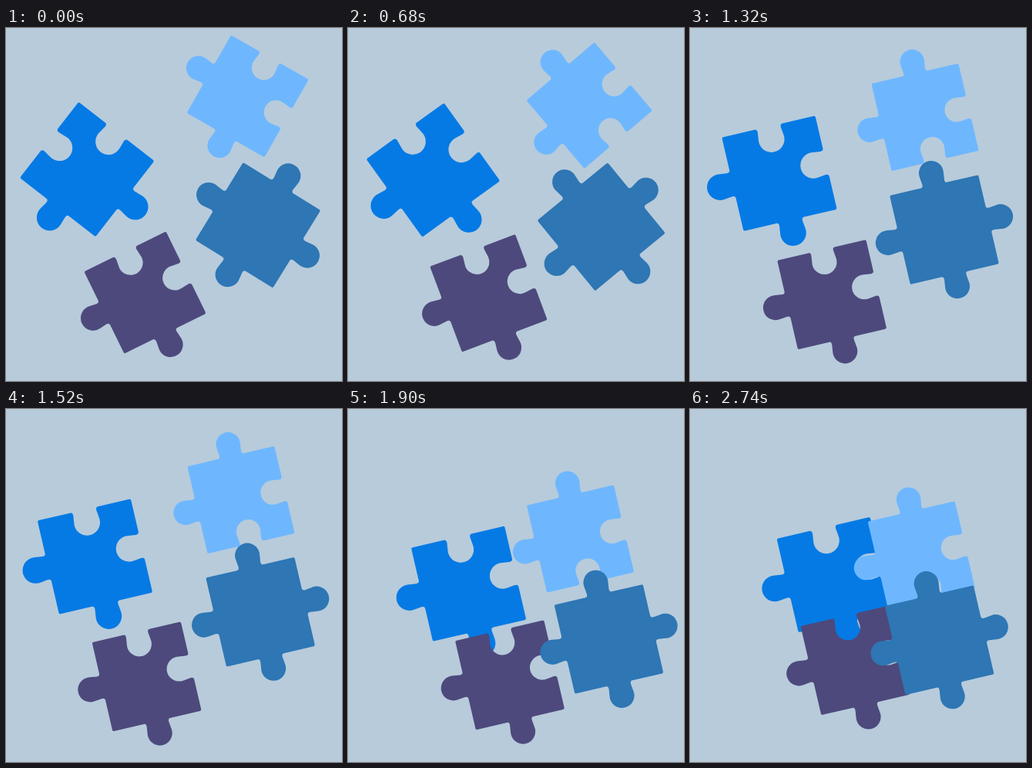
An HTML page with a canvas that plays this animation: 436x457 px, repeating every 6040 ms.

```html
<!DOCTYPE html>
<html lang="en">
<head>
<meta charset="utf-8">
<title>Puzzle</title>
<style>
html, body { margin: 0; width: 100%; height: 100%; overflow: hidden; background: #b7cbdb; }
canvas { display: block; }
</style>
</head>
<body>
<canvas id="stage" width="436" height="457"></canvas>
<script>
const ctx = document.getElementById('stage').getContext('2d');
const LOOP = 6040, TURN_END = 1240, JOIN_END = 2740;
const HALF = 59, END_ANGLE = -13.1;

// Progress values at which the waypoints below are reached.
const TURN_STOPS = [0, 0.42, 1];
const JOIN_STOPS = [0, 0.13, 0.365, 0.715, 0.939, 1];

// Back to front. Edges run top, right, bottom, left: 1 is a knob, -1 a socket.
const pieces = [
  { color: '#057ae4', size: 124.4, angle: -52.2, edges: [-1, -1, 1, 1],
    turn: [[105.2, 183], [110.5, 183.8], [116, 188]],
    join: [[116, 188], [113.2, 202.2], [118, 226], [156.5, 226.2], [181.5, 214.9], [187.2, 214.5]] },
  { color: '#4d497c', size: 118.3, angle: -26.1, edges: [-1, -1, 1, 1],
    turn: [[180.5, 342.5], [182.5, 343.3], [184.3, 345]],
    join: [[184.3, 345], [180, 352.5], [188, 361.7], [210, 344.4], [214, 329.5], [214.5, 325.3]] },
  { color: '#6eb7ff', size: 116, angle: -60.3, edges: [1, -1, -1, 1],
    turn: [[313.7, 88.3], [313.2, 100.2], [305, 115.3]],
    join: [[305, 115.3], [304.5, 125], [303, 142.3], [301.5, 168], [300.5, 184.5], [300.3, 189]] },
  { color: '#2e76b4', size: 118.1, angle: -58.4, edges: [1, 1, 1, 1],
    turn: [[327, 255.3], [328.7, 257.3], [330, 261]],
    join: [[330, 261], [332, 267.8], [339, 280.5], [338.5, 297.8], [327.5, 300.5], [323.7, 299.2]] }
];

// Ease with flat ends; x1 and x2 are the handle positions in time.
function ease(x, x1, x2) {
  if (x <= 0) return 0;
  if (x >= 1) return 1;
  let lo = 0, hi = 1, u;
  for (let i = 0; i < 30; i++) {
    u = (lo + hi) / 2;
    const v = 1 - u;
    if (3 * v * v * u * x1 + 3 * v * u * u * x2 + u * u * u < x) lo = u;
    else hi = u;
  }
  return u * u * (3 - 2 * u);
}

// Point at p on the smooth polynomial path through all waypoints.
function along(points, stops, p) {
  let x = 0, y = 0;
  points.forEach((pt, i) => {
    let w = 1;
    stops.forEach((s, j) => { if (j !== i) w *= (p - s) / (stops[i] - s); });
    x += w * pt[0];
    y += w * pt[1];
  });
  return [x, y];
}

function drawEdge(d) {
  ctx.lineTo(-17.5, -HALF);
  ctx.quadraticCurveTo(-14.5, -HALF, -14.6, -HALF - 4 * d);
  ctx.arc(0, -HALF - 16 * d, 16, d * (Math.PI - 0.19), d * (2 * Math.PI + 0.19), d < 0);
  ctx.lineTo(14.6, -HALF - 4 * d);
  ctx.quadraticCurveTo(14.5, -HALF, 17.5, -HALF);
  ctx.lineTo(HALF - 2, -HALF);
  ctx.quadraticCurveTo(HALF, -HALF, HALF, 2 - HALF);
}

function drawPiece(piece, t) {
  const turned = ease(t / TURN_END, 0.883, 0.293);
  const joined = ease((t - TURN_END) / (JOIN_END - TURN_END), 0.73, -0.018);
  const [x, y] = t < TURN_END
    ? along(piece.turn, TURN_STOPS, turned)
    : along(piece.join, JOIN_STOPS, joined);
  const angle = piece.angle + (END_ANGLE - piece.angle) * turned;
  const scale = piece.size / (2 * HALF);

  ctx.save();
  ctx.translate(x, y);
  ctx.rotate(angle * Math.PI / 180);
  ctx.scale(scale, scale);
  ctx.beginPath();
  for (const d of piece.edges) {
    drawEdge(d);
    ctx.rotate(Math.PI / 2);
  }
  ctx.closePath();
  ctx.fillStyle = piece.color;
  ctx.fill();
  ctx.restore();
}

let start;
function frame(now) {
  start ??= now;
  const t = (now - start) % LOOP;
  ctx.fillStyle = '#b7cbdb';
  ctx.fillRect(0, 0, 436, 457);
  for (const piece of pieces) drawPiece(piece, t);
  requestAnimationFrame(frame);
}
requestAnimationFrame(frame);
</script>
</body>
</html>
```
